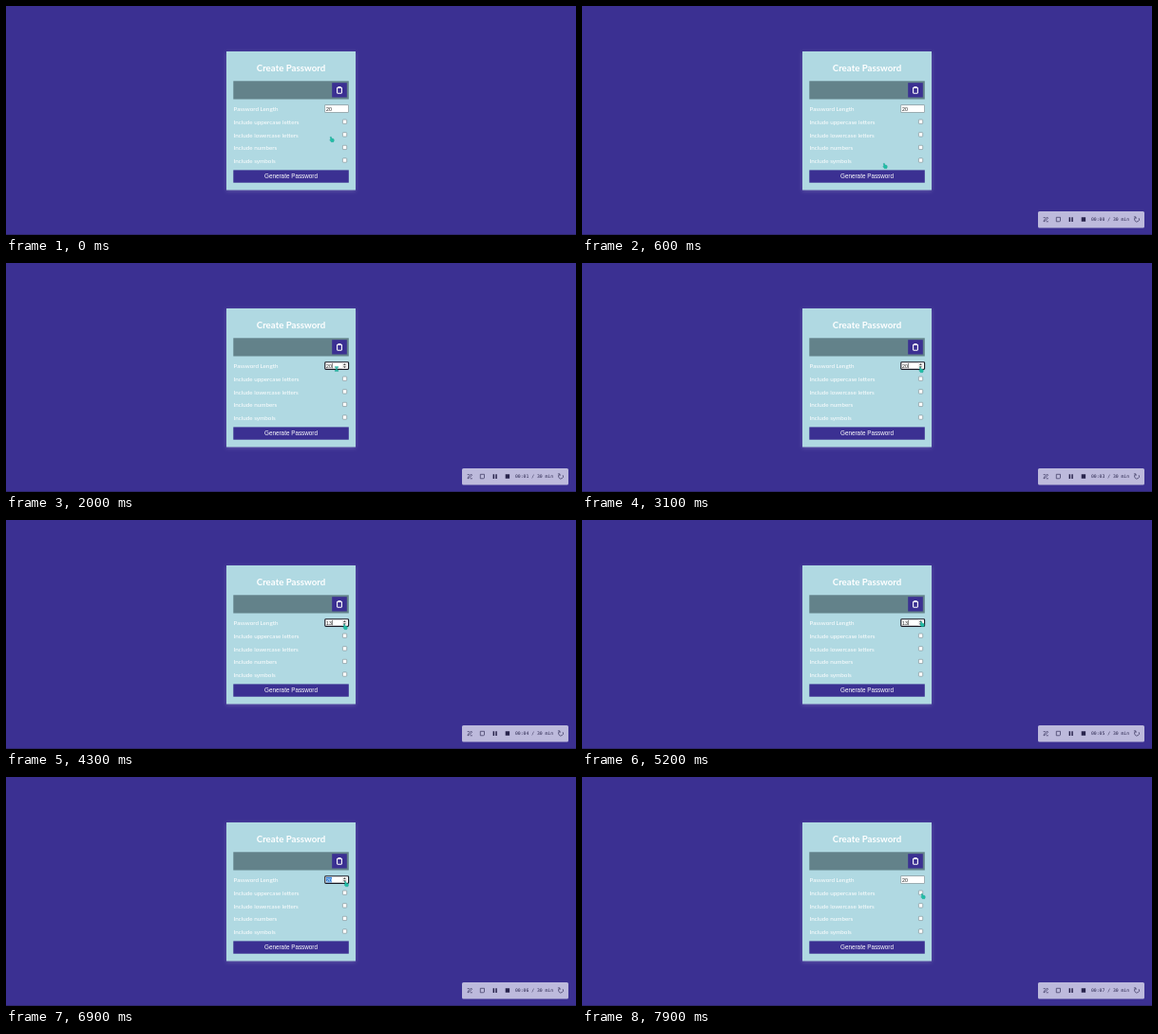
An HTML page for the animation above (8 s loop, 600 by 242 pixels).

```html
<!DOCTYPE html>
<html lang="en">
<head>
<meta charset="utf-8">
<title>Password generator</title>
<style>
  html, body { margin: 0; width: 100%; height: 100%; overflow: hidden; background: #3b3092; }
  svg { display: block; width: 600px; height: 242px; }
  .label { font: 6.3px Lato, sans-serif; fill: #fff; }
  .title { font: bold 9.7px Lato, sans-serif; fill: #fff; }
  .ui { font-family: "Liberation Sans", Arial, sans-serif; }
  .clock { font: 4.76px "DejaVu Sans Mono", monospace; fill: #28244c; white-space: pre; }
</style>
</head>
<body>
<svg viewBox="0 0 600 242">
  <defs>
    <filter id="glow" x="-10%" y="-10%" width="120%" height="120%">
      <feDropShadow dx="0" dy="1" stdDeviation="2" flood-color="#fff" flood-opacity=".2"/>
    </filter>
  </defs>
  <rect width="600" height="242" fill="#3b3092"/>
  <rect y="241" width="600" height="1" fill="#2f2870"/>
  <rect x="232" y="48" width="136" height="146.5" fill="#b0d9e2" filter="url(#glow)"/>
  <text class="title" x="300" y="69" text-anchor="middle">Create Password</text>

  <rect x="239.3" y="79.3" width="121.5" height="19.2" fill="#63828a"/>
  <rect x="343.2" y="81.2" width="15.6" height="15.3" fill="#3b3092"/>
  <rect x="348.6" y="86.2" width="4.8" height="6" rx=".6" fill="none" stroke="#fff" stroke-width="1.1"/>
  <rect x="349.5" y="84.9" width="3" height="2.1" rx=".5" fill="#fff"/>

  <text class="label" x="239.5" y="110.8">Password Length</text>
  <g id="options"></g>

  <rect id="box" x="335.8" y="104.7" width="24.8" height="7.7" fill="#fff"/>
  <rect id="selection" x="337" y="105.8" width="6" height="5.6" fill="#2f7fd8"/>
  <text id="value" class="ui" x="337" y="110.5" font-size="5.3"></text>
  <rect id="caret" x="343" y="105.8" width=".5" height="5.4" fill="#111"/>
  <g id="spinner">
    <rect x="353.8" y="105.6" width="5.2" height="6" fill="#ececec"/>
    <path d="M355 108l1.4-1.7 1.4 1.7zM355 109.3l1.4 1.7 1.4-1.7z" fill="#444"/>
  </g>

  <rect x="239.3" y="173.4" width="121.5" height="13.3" fill="#3b3092"/>
  <text class="ui" x="300" y="182.2" font-size="6.33" fill="#fff" text-anchor="middle">Generate Password</text>

  <g id="toolbar">
    <rect x="480" y="217" width="112" height="17.5" rx="1.6" fill="#bdbadc"/>
    <g fill="none" stroke="#454069" stroke-width=".8">
      <path d="M486 227.9l.6-1.8 3-3 1 1-3 3zM485.7 223.6h2M488.7 227.8h2.2"/>
      <path d="M502.8 227.8h-3.5v-4.5h4.2v3.8z"/>
      <path d="M586.2 224.2a2.5 2.5 0 1 1-3.4-.9M580.9 222.9h2.1v2.1"/>
    </g>
    <path d="M512.6 223.2h1.5v4.7h-1.5zM515.3 223.2h1.5v4.7h-1.5zM525.7 223.3h4.4v4.4h-4.4z" fill="#28244c"/>
    <text id="clock" class="clock" x="536" y="227.4"></text>
  </g>

  <g id="cursor" fill="#20bfa5" stroke="#158f88" stroke-width=".3">
    <path id="hand" d="M-1.8-2.6l1.1-.2.8 1.9 1.9.4.4 1.5-.6 1.7h-2.5l-1.6-2.1 1-.4z"/>
    <path id="beam" d="M-1.8-2.4h3.6v.9h-1.2v2.8h1.2v1.1h-3.6v-1.1h1.2v-2.8h-1.2z"/>
  </g>
</svg>
<script>
const LOOP = 8000;
const el = Object.fromEntries([...document.querySelectorAll('[id]')].map(n => [n.id, n]));
const show = (node, on) => node.setAttribute('visibility', on ? 'visible' : 'hidden');

el.options.innerHTML = ['uppercase letters', 'lowercase letters', 'numbers', 'symbols'].map((name, i) => {
  const y = 125 + i * 13.6;
  return `<text class="label" x="239.5" y="${y}">Include ${name}</text>
    <rect x="354.4" y="${y - 4.9}" width="4.3" height="4.3" rx=".6" fill="#fff" stroke="#77878c" stroke-width=".6"/>`;
}).join('');

// Cursor stops: time, x, y
const path = [
  [0, 343, 141], [100, 343, 141], [600, 319, 169], [900, 319, 168],
  [1600, 348, 112], [2300, 348, 112], [2800, 357, 113], [4600, 357, 113],
  [4850, 358, 110], [6700, 358, 110], [7400, 359, 126], [LOOP, 359, 126]
];

function cursorAt(t) {
  const i = Math.max(1, path.findIndex(p => p[0] > t));
  const [t0, x0, y0] = path[i - 1], [t1, x1, y1] = path[i];
  const k = (t - t0) / (t1 - t0), e = k * k * (3 - 2 * k);
  return [x0 + (x1 - x0) * e, y0 + (y1 - y0) * e];
}

// A held spin button steps once, pauses 500 ms, then repeats every 100 ms.
function spinSteps(t, start, max) {
  if (t < start) return 0;
  return Math.min(max, 1 + Math.max(0, Math.floor((t - start - 400) / 100)));
}

function render(t) {
  const [x, y] = cursorAt(t);
  const focused = t >= 1700 && t < 6950;
  const selected = focused && t >= 6050;
  const inText = t >= 1500 && t < 2550;

  el.cursor.setAttribute('transform', `translate(${x} ${y})`);
  show(el.hand, !inText);
  show(el.beam, inText);

  el.value.textContent = 20 - spinSteps(t, 3300, 8) + spinSteps(t, 4900, 8);
  el.value.setAttribute('fill', selected ? '#fff' : '#222');
  el.box.setAttribute('stroke', focused ? '#171722' : '#77878c');
  el.box.setAttribute('stroke-width', focused ? 1.1 : .6);
  el.box.setAttribute('rx', focused ? .9 : 0);
  show(el.selection, selected);
  show(el.caret, focused && !selected);
  show(el.spinner, focused);

  show(el.toolbar, t >= 100);
  const seconds = Math.max(0, Math.floor((t - 50) / 1000));
  el.clock.textContent = `00:0${seconds} / 30 min`;
}

let begin;
function tick(now) {
  begin ??= now;
  render((now - begin) % LOOP);
  requestAnimationFrame(tick);
}
render(0);
requestAnimationFrame(tick);
</script>
</body>
</html>
```
